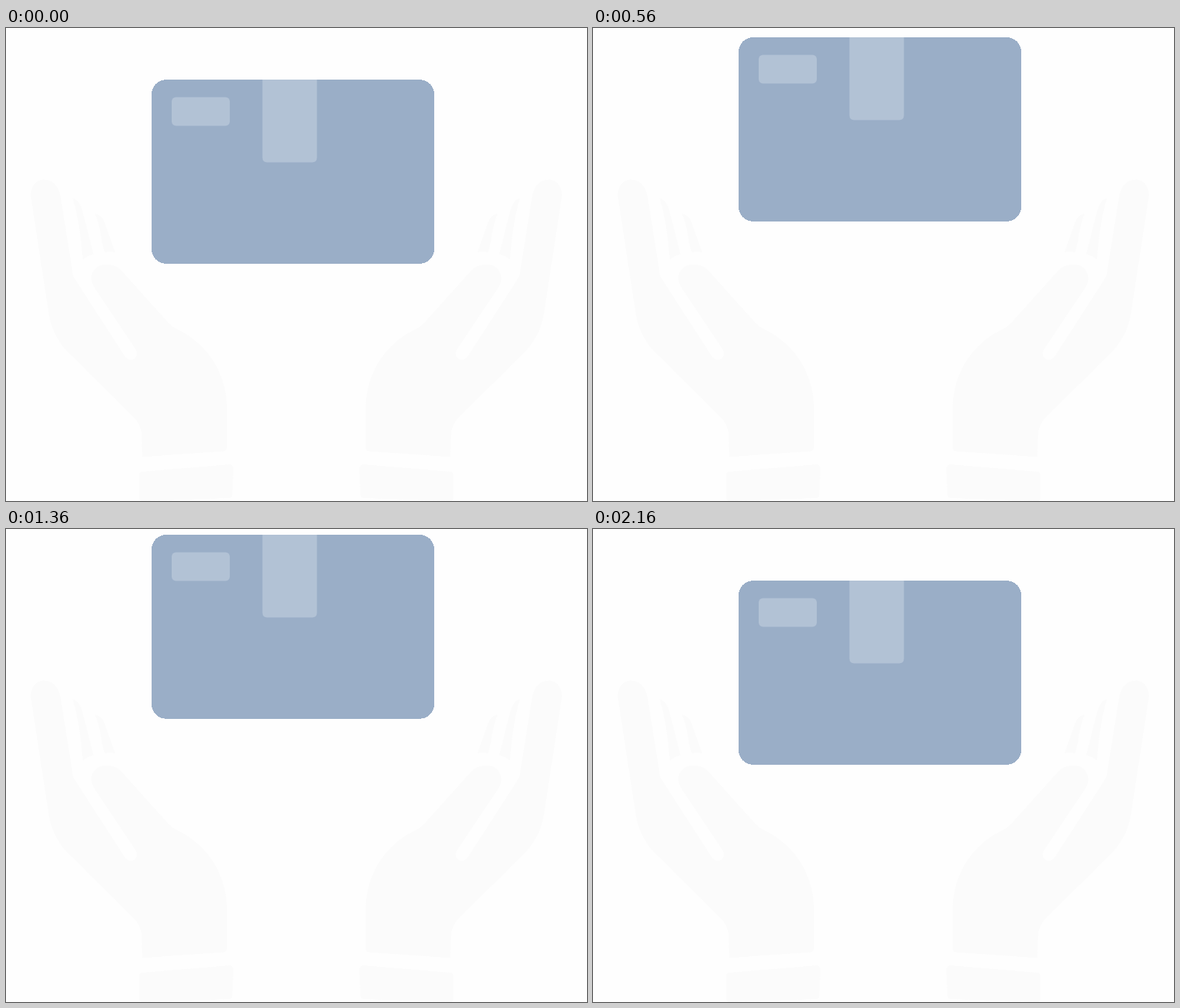
An HTML page that plays this animation: 810 by 660 pixels, repeating every 2.2 s.

```html
<!DOCTYPE html>
<html lang="en">
<head>
<meta charset="utf-8">
<title>Parcel in caring hands</title>
<style>
  html, body { margin: 0; width: 100%; height: 100%; overflow: hidden; background: #fefefe; }
  svg { display: block; }
</style>
</head>
<body>
<svg width="810" height="660" viewBox="0 0 810 660">
  <defs>
    <g id="hand" fill="#fbfbfb">
      <path d="M34.500 234C34.500 221 42 211.500 53 211.500C64 211.500 73 219 76 235L92 335C93 344 93 345 96 350L165 457
        C167 460 170 463 174 463C180 463 185 456 180.500 448L125 365C121 359 119 355 119 349C119 341 125 330 139 330
        C149 330 156 332 165 343L227 412C231 416 235 419 240 421C280 440 308 482 308 530V585Q308 590 304 590.500
        L190 598.500L189 564C187 556 184 549 179 544L84 450C70 434 62 417 59 395Z"/>
      <path d="M93 237Q103 241 107 257L122 316Q114 317 107 323L104 293Q100 261 93 237Z"/>
      <path d="M124 259Q135 261 139 276L152 313Q146 311 138 313Q134 304 132 287Q129 270 124 259Z"/>
      <path d="M190 619L311 609Q317 609 317 615L315.500 651Q315 656 310 656L190 660Q186 660 186 656V624Q186 619 190 619Z"/>
    </g>
  </defs>
  <use href="#hand"/>
  <use href="#hand" transform="translate(809.500) scale(-1 1)"/>
  <rect id="box" x="203" width="394" height="256.600" rx="20" fill="#9aaec7" shape-rendering="crispEdges"/>
  <path id="tape" fill="#b2c2d5"/>
  <rect id="label" x="231" width="81" height="40" rx="6" fill="#b2c2d5"/>
</svg>
<script>
  const [box, tape, label] = ['box', 'tape', 'label'].map(id => document.getElementById(id));
  const LOOP = 2200, STEP = 40, TURN = 1160, LOW = 72.2, LIFT = 72;

  // Cubic bezier (.486, 0, .0155, 1), solved for x by bisection
  function ease(x) {
    if (x >= 1) return 1;
    let lo = 0, hi = 1;
    for (let i = 0; i < 30; i++) {
      const u = (lo + hi) / 2, v = 1 - u;
      if (3 * u * v * (.486 * v + .0155 * u) + u ** 3 < x) lo = u; else hi = u;
    }
    return lo * lo * (3 - 2 * lo);
  }

  function draw(now) {
    const t = Math.floor(now % LOOP / STEP) * STEP;
    const height = t < TURN ? ease(t / 1185) : 1 - ease((t - TURN) / 1000);
    const y = LOW - LIFT * height;
    box.setAttribute('y', y);
    label.setAttribute('y', y + 24.3);
    // The tape's top edge sits on a whole pixel, its bottom edge moves freely
    tape.setAttribute('d', `M357.5 ${Math.floor(y)}H433.5V${y + 108.300}q0 7 -7 7H364.5q-7 0 -7 -7Z`);
    requestAnimationFrame(draw);
  }
  draw(0);
</script>
</body>
</html>
```
